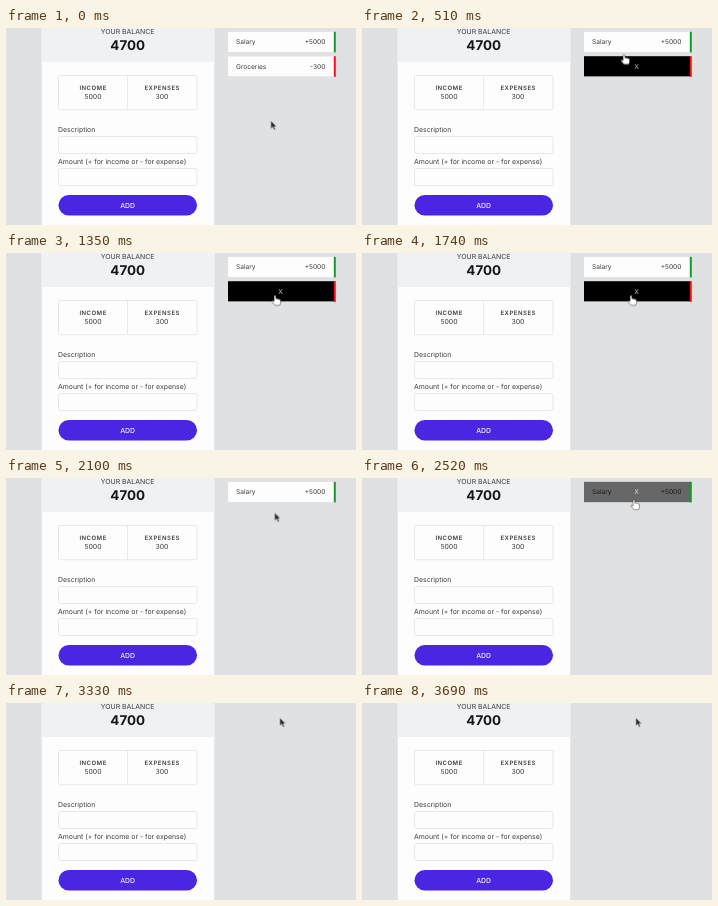
An HTML page for the animation above (3720 ms loop, 350 by 197 pixels).

```html
<!DOCTYPE html>
<html lang="en">
<head>
<meta charset="utf-8">
<title>Balance tracker</title>
<style>
html, body { margin: 0; width: 100%; height: 100%; overflow: hidden; background: #e0e1e3; }
svg { display: block; width: 100%; height: 100%; }
text { font: 400 6.92px Inter, sans-serif; fill: #3c3e42; text-rendering: geometricPrecision; }
.mid { text-anchor: middle; }
.end { text-anchor: end; }
.total { font-size: 13.4px; font-weight: 700; fill: #161616; }
.head { font-size: 6px; font-weight: 600; letter-spacing: .5px; }
.item text { font-size: 6.6px; }
.item .x { font-weight: 500; fill: #aaa; }
.add { font-weight: 500; fill: #efecfd; }
.box { fill: #fdfdfd; stroke: #e3e4e5; stroke-width: .8; }
.card { filter: drop-shadow(0 .3px .7px #0002); }

.item, .cover, .cursor, .arrow, .hand { animation: 3.72s linear infinite; }
.cursor { animation-name: travel; }
.arrow, .hand, .item { animation-timing-function: step-end; }
.arrow { animation-name: arrow; }
.hand { animation-name: hand; }
.salary { animation-name: drop-salary; }
.groceries { animation-name: drop-groceries; }
.salary .cover { animation-name: hover-salary; }
.groceries .cover { animation-name: hover-groceries; }

@keyframes travel {
  0%, 2% { transform: translate(264.8px, 92.7px); }
  9% { transform: translate(263px, 49px); }
  13.71% { transform: translate(262px, 26.6px); }
  19% { transform: translate(262px, 13px); }
  28.23% { transform: translate(264px, 18px); }
  31% { transform: translate(265px, 26px); }
  36.29%, 47% { transform: translate(269px, 42.5px); }
  56.45% { transform: translate(268.6px, 34.7px); }
  66% { transform: translate(271px, 25px); }
  72% { transform: translate(274px, 14px); }
  80.65%, 85% { transform: translate(275px, 12.7px); }
  89%, 100% { transform: translate(273.8px, 14.8px); }
}
@keyframes arrow {
  0%, 47%, 85%, 100% { opacity: 1; }
  9%, 66% { opacity: 0; }
}
@keyframes hand {
  0%, 47%, 85%, 100% { opacity: 0; }
  9%, 66% { opacity: 1; }
}
@keyframes drop-salary { 0% { opacity: 1; } 85%, 100% { opacity: 0; } }
@keyframes drop-groceries { 0% { opacity: 1; } 47%, 100% { opacity: 0; } }
@keyframes hover-salary {
  0%, 14.5% { opacity: 0; }
  17.5%, 30.5% { opacity: 1; }
  33.5%, 66% { opacity: 0; }
  69%, 100% { opacity: 1; }
}
@keyframes hover-groceries {
  0%, 9% { opacity: 0; }
  12%, 14% { opacity: 1; }
  17%, 31.5% { opacity: 0; }
  34.5%, 100% { opacity: 1; }
}
</style>
</head>
<body>
<svg viewBox="0 0 350 197" preserveAspectRatio="none">
  <g class="card">
    <rect x="35.5" y="-5" width="173" height="210" fill="#fdfdfd"/>
    <rect x="35.5" y="-5" width="173" height="39" fill="#eff1f2"/>
  </g>
  <text class="mid" x="121.6" y="6.1">YOUR BALANCE</text>
  <text class="mid total" x="121.7" y="21.6">4700</text>

  <rect class="box" x="52.5" y="47.5" width="138.5" height="34.2" rx="1"/>
  <path d="M121.5 47.5V81.7" stroke="#e3e4e5" stroke-width=".8"/>
  <text class="mid head" x="87.1" y="62.1">INCOME</text>
  <text class="mid" x="87" y="71.1">5000</text>
  <text class="mid head" x="156.2" y="62.1">EXPENSES</text>
  <text class="mid" x="156" y="71.1">300</text>

  <text x="52" y="103.8">Description</text>
  <rect class="box" x="52.5" y="108.5" width="138.5" height="17" rx="2"/>
  <text x="52" y="136.2">Amount (+ for income or - for expense)</text>
  <rect class="box" x="52.5" y="140.5" width="138.5" height="17" rx="2"/>
  <rect x="52.5" y="167" width="138.5" height="20.6" rx="10.3" fill="#4a26e2"/>
  <text class="mid add" x="121.6" y="179.8">ADD</text>

  <g class="item salary">
    <rect class="card" x="222" y="3.8" width="107.8" height="20.4" rx="1" fill="#fdfdfd"/>
    <text x="230" y="16.4">Salary</text>
    <text class="end" x="319.4" y="16.4">+5000</text>
    <g class="cover">
      <rect x="222" y="3.8" width="107" height="20.4"/>
      <text class="mid x" x="274.6" y="16.4">X</text>
    </g>
    <rect x="327.8" y="3.8" width="2" height="20.6" fill="#159a24"/>
  </g>
  <g class="item groceries">
    <rect class="card" x="222" y="28.2" width="107.8" height="20.2" rx="1" fill="#fdfdfd"/>
    <text x="230" y="40.8">Groceries</text>
    <text class="end" x="319.4" y="40.8">-300</text>
    <g class="cover">
      <rect x="222" y="28.2" width="107" height="20.2"/>
      <text class="mid x" x="274.6" y="40.5">X</text>
    </g>
    <rect x="327.8" y="28.2" width="2" height="20.6" fill="#f5120f"/>
  </g>

  <g class="cursor">
    <path class="arrow" d="M0 0V8L1.9 6.3 3.2 9.2 4.6 8.6 3.3 5.8H5.8Z" fill="#2c2c2c" stroke="#ddd" stroke-width=".5"/>
    <path class="hand" d="M-.9 .7Q-.9 0 0 0T.9 .7V3.3Q2 2.7 2.6 3.6 3.6 3.1 4.2 4 5.6 3.8 5.6 5V7.2L4.8 9.8H-.1L-2.9 6.3Q-3.1 5.1-2 5.2L-.9 6.2Z" fill="#fff" stroke="#333" stroke-width=".5"/>
  </g>
</svg>
</body>
</html>
```
